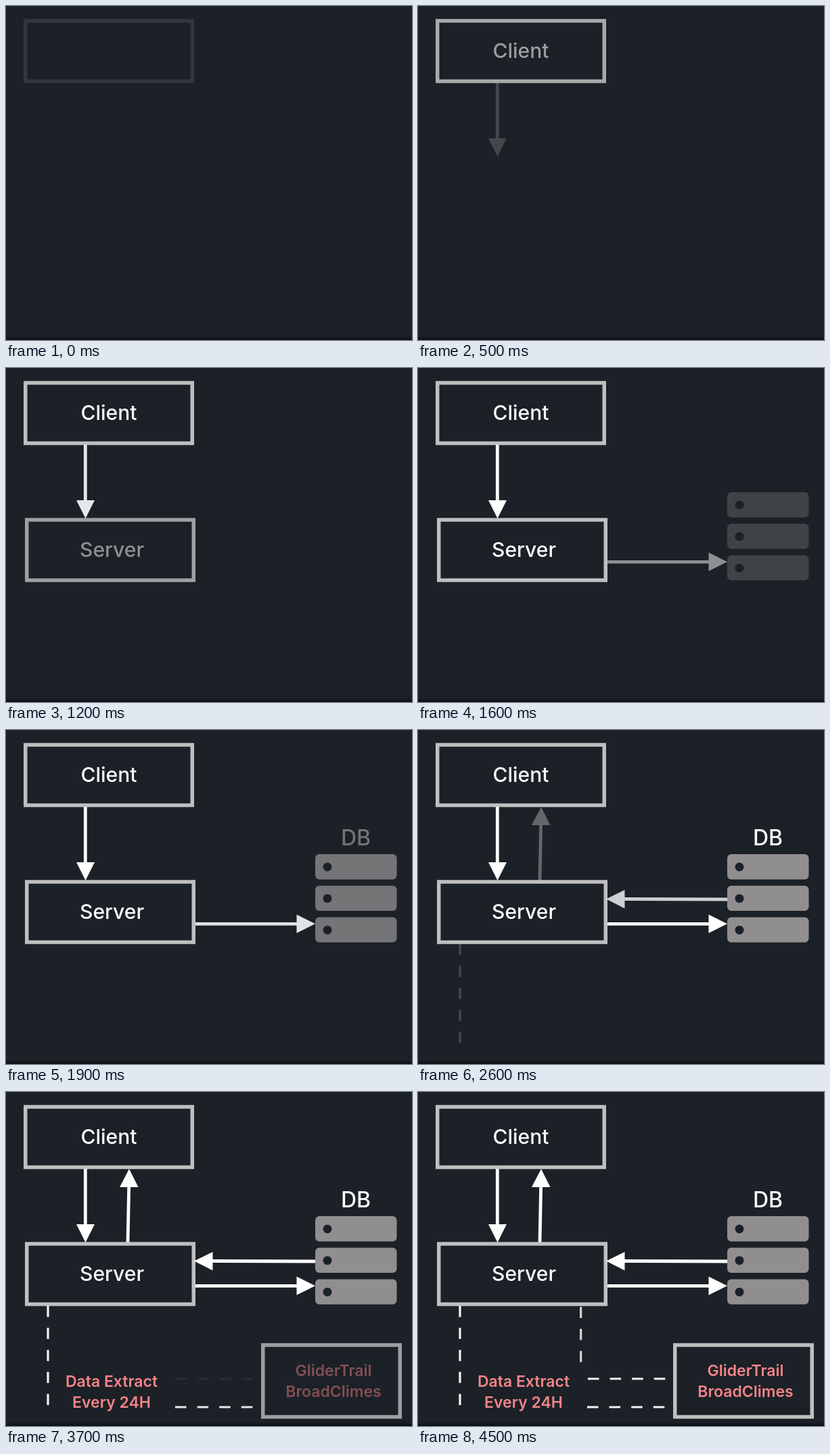
An HTML page for the animation above (4.6 s loop, 600 by 495 pixels).

```html
<!DOCTYPE html>
<html lang="en">
<head>
<meta charset="utf-8">
<title>Client and server diagram</title>
<style>
  html, body { margin: 0; width: 100%; height: 100%; overflow: hidden; background: #1b2127; }
  svg { display: block; width: 600px; height: 495px; }
  text { font: 500 30px Inter, "Open Sans", sans-serif; fill: #fff; text-anchor: middle; }
  .db { font-size: 32px; }
  .pink { font-size: 23px; font-weight: 600; fill: #f58489; }
  .box { fill: none; stroke: #bfbfc0; stroke-width: 5.5; }
  .arrow { fill: #fff; stroke: none; }
  .arrow line { stroke: #fff; stroke-width: 4.8; }
  .dash { stroke: #f2f2f3; stroke-width: 3.2; stroke-dasharray: 16.5 16.1; }
  .disk { fill: #918e8f; }
  .dot { fill: #1b2127; }
</style>
</head>
<body>
<svg viewBox="0 0 600 495">
  <defs>
    <linearGradient id="edge" x2="0" y2="1">
      <stop stop-color="#1b2127"/>
      <stop offset="1" stop-color="#0b0f13"/>
    </linearGradient>
  </defs>
  <rect width="600" height="495" fill="#1b2127"/>
  <rect y="489" width="600" height="6" fill="url(#edge)"/>

  <!-- data-fade: start and end of the fade-in, in ms -->
  <rect class="box" data-fade="-100 600" x="28.75" y="22" width="246.5" height="89.5"/>
  <text data-fade="0 900" x="152" y="76.5">Client</text>
  <g class="arrow" data-fade="340 1300">
    <line x1="117.3" y1="114" x2="117.3" y2="198"/>
    <path d="M104 196H131L117.5 223Z"/>
  </g>

  <rect class="box" data-fade="650 1330" x="30.75" y="225" width="246.5" height="89.5"/>
  <text data-fade="800 1600" x="156.5" y="279.5">Server</text>
  <g class="arrow" data-fade="1200 2000">
    <line x1="280" y1="287.3" x2="431" y2="287.3"/>
    <path d="M429.5 273.5V301L457 287.3Z"/>
  </g>

  <g data-fade="1400 2050">
    <g id="disks"></g>
  </g>
  <text class="db" data-fade="1600 2400" x="517" y="171">DB</text>

  <g class="arrow" data-fade="2050 2750">
    <line x1="457" y1="251" x2="304" y2="250.5"/>
    <path d="M305.5 237V264.5L278 250.5Z"/>
  </g>
  <g class="arrow" data-fade="2300 3250">
    <line x1="180" y1="222.5" x2="181.7" y2="139"/>
    <path d="M168 141H195.5L182 114Z"/>
  </g>

  <line class="dash" data-fade="2450 3250" x1="62" y1="317" x2="62" y2="464"/>
  <g data-fade="2600 3350">
    <text class="pink" x="156" y="437">Data Extract</text>
    <text class="pink" x="156" y="468">Every 24H</text>
  </g>
  <line class="dash" data-fade="2850 3750" x1="250" y1="467" x2="364.3" y2="467"/>

  <rect class="box" data-fade="3200 3830" x="379.75" y="375" width="202.5" height="106.5"/>
  <g data-fade="3350 4100">
    <text class="pink" x="484" y="421">GliderTrail</text>
    <text class="pink" x="484" y="452">BroadClimes</text>
  </g>
  <line class="dash" data-fade="3650 4500" x1="251" y1="425" x2="367" y2="425"/>
  <line class="dash" data-fade="3850 4600" x1="240.7" y1="318.5" x2="240.7" y2="401"/>
</svg>
<script>
  const LOOP = 4600, STEP = 100;

  document.getElementById("disks").innerHTML = [184, 230.7, 277.4].map(y =>
    `<rect class="disk" x="457" y="${y}" width="120.5" height="37.4" rx="6"/>
     <circle class="dot" cx="475" cy="${y + 19}" r="6.5"/>`).join("");

  const parts = [...document.querySelectorAll("[data-fade]")].map(el => {
    const [start, end] = el.dataset.fade.split(" ").map(Number);
    return { el, start, end };
  });

  const origin = performance.now();

  function draw() {
    const now = (performance.now() - origin) % LOOP;
    const t = Math.floor(now / STEP) * STEP;
    for (const { el, start, end } of parts) {
      const k = (t - start) / (end - start);
      el.setAttribute("opacity", Math.min(1, Math.max(0, k)));
    }
    requestAnimationFrame(draw);
  }
  draw();
</script>
</body>
</html>
```
